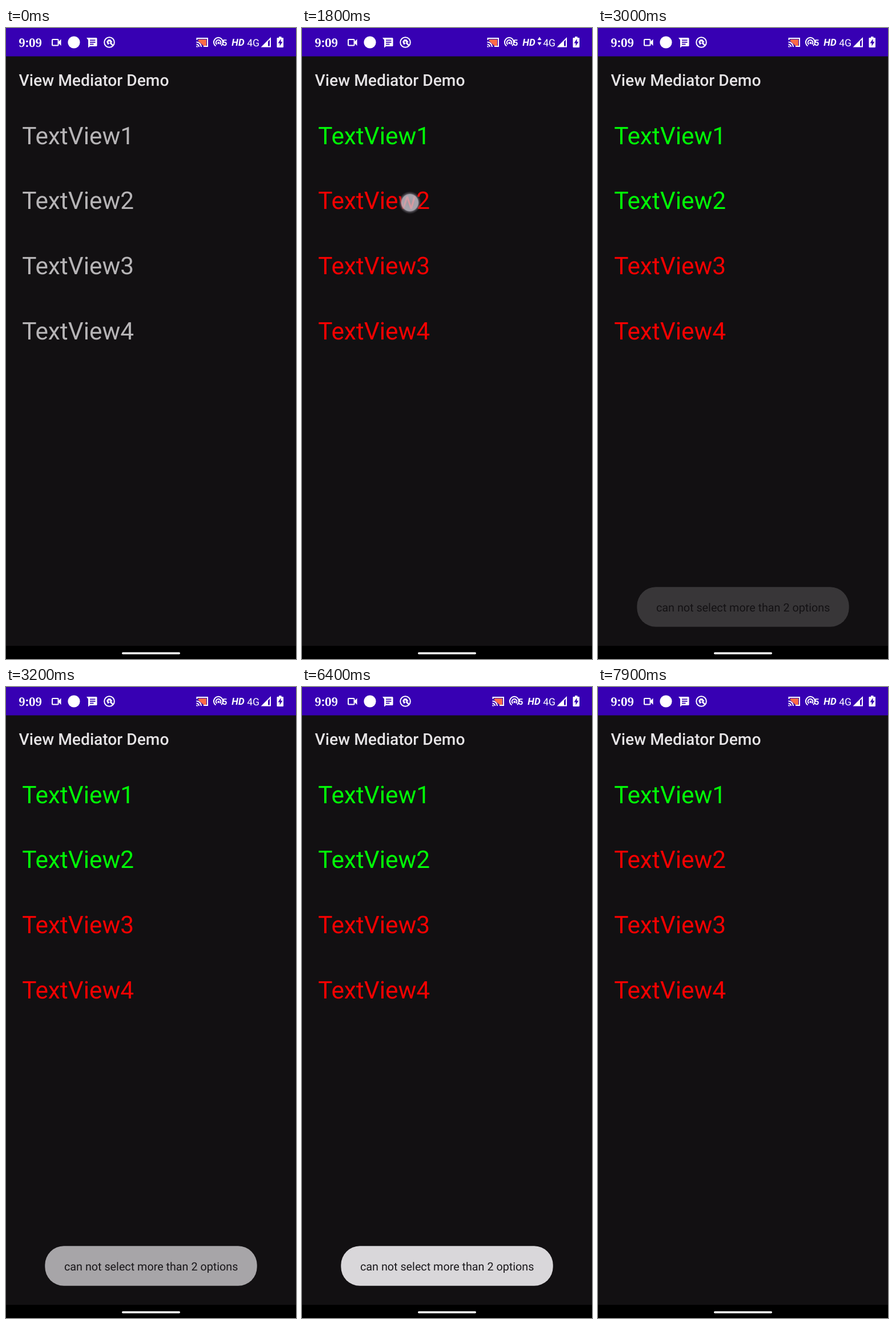
Recreate the animation shown at these times as an HTML page. Size 508 px wide and 1102 px high, loop 8000 ms.

```html
<!DOCTYPE html>
<html lang="en">
<head>
<meta charset="utf-8">
<title>View Mediator Demo</title>
<style>
  html, body { margin: 0; width: 100%; height: 100%; overflow: hidden; background: #121012; }
  svg { display: block; width: 508px; height: 1102px; }
  text { font-family: Roboto, sans-serif; text-rendering: geometricPrecision; }

  .row, .tap, .toast, .arrows, .shift { animation: 8s step-end -16ms infinite; }

  .clock { font: 700 20.5px "Noto Serif", serif; }
  .title { font-size: 28.2px; font-weight: 500; fill: #e5e3e5; }
  .hd { font-size: 17px; font-weight: 700; font-style: italic; font-stretch: 75%; text-anchor: middle; }
  .net { font-size: 17.5px; font-stretch: 75%; text-anchor: end; }
  .five { font-size: 15px; font-weight: 700; }
  .line { fill: none; stroke: #fff; stroke-width: 2; }
  .bar { fill: #3700b3; }

  .row { font-size: 42.33px; fill: #b6b4b6; animation-name: other; }
  .row.first { animation-name: first; }
  .row.second { animation-name: second; }
  @keyframes first { 0% { fill: #b6b4b6 } 8.75%, 100% { fill: #00fc06 } }
  @keyframes second {
    0% { fill: #b6b4b6 }
    8.75% { fill: #f60000 }
    23.75% { fill: #00fc06 }
    97.5%, 100% { fill: #f60000 }
  }
  @keyframes other { 0% { fill: #b6b4b6 } 8.75%, 100% { fill: #f60000 } }

  .tap { opacity: 0; animation-name: tap; }
  @keyframes tap {
    0% { opacity: 0; transform: translate(189px, 191px) }
    7.5% { opacity: 1; transform: translate(189px, 191px) }
    8.75% { opacity: 0; transform: translate(189px, 305px) }
    22.5% { opacity: 1; transform: translate(189px, 305px) }
    23.75% { opacity: 0; transform: translate(191px, 418px) }
    35% { opacity: 1; transform: translate(191px, 418px) }
    36.25% { opacity: 0; transform: translate(189px, 305px) }
    96.25% { opacity: 1; transform: translate(189px, 305px) }
    97.5%, 100% { opacity: 0; transform: translate(189px, 305px) }
  }

  /* Half a second each way: decelerating in, accelerating out. */
  .toast { opacity: 0; animation-name: toast; }
  .toast text { font-size: 19.75px; fill: #1b191c; }
  @keyframes toast {
    0% { opacity: 0 }
    37.5% { opacity: .19 }
    38.75% { opacity: .51 }
    40% { opacity: .75 }
    41.25% { opacity: .91 }
    42.5% { opacity: .99 }
    43.75% { opacity: 1 }
    81.25% { opacity: .98 }
    82.5% { opacity: .88 }
    83.75% { opacity: .71 }
    85% { opacity: .45 }
    86.25% { opacity: .12 }
    87.5%, 100% { opacity: 0 }
  }

  .arrows { opacity: 0; animation-name: arrows; }
  .shift { animation-name: shift; }
  @keyframes arrows { 0% { opacity: 0 } 15% { opacity: 1 } 27.5%, 100% { opacity: 0 } }
  @keyframes shift {
    0% { transform: none }
    15% { transform: translateX(-9px) }
    27.5%, 100% { transform: none }
  }
</style>
</head>
<body>
<svg viewBox="0 0 508 1102">
  <defs>
    <radialGradient id="touch">
      <stop offset="0" stop-color="#d3ccd6" stop-opacity=".72"/>
      <stop offset=".55" stop-color="#c5c0ca" stop-opacity=".84"/>
      <stop offset=".72" stop-color="#b5b1ba" stop-opacity=".9"/>
      <stop offset=".8" stop-color="#77737c" stop-opacity=".6"/>
      <stop offset="1" stop-color="#55515a" stop-opacity="0"/>
    </radialGradient>
  </defs>

  <rect width="508" height="1102" fill="#121012"/>
  <rect class="bar" width="508" height="49.5"/>
  <rect y="1079" width="508" height="23"/>
  <rect x="203" y="1090.3" width="102" height="3.4" rx="1.7" fill="#fff"/>

  <g fill="#fff">
    <text class="clock" x="22.3" y="32.5">9:09</text>
    <rect class="line" x="81" y="20" width="10.5" height="10.5" rx="1"/>
    <path d="M92 24l4.500-4.500v11.500l-4.500-4.500z"/>
    <circle cx="119" cy="25" r="10.600"/>
    <path d="M141 17h17a1.500 1.500 0 0 1 1.500 1.500v12a1.500 1.500 0 0 1-1.500 1.500h-11l-3 2.500v-13.500z"/>
    <path class="bar" d="M147 20.500h9.500v1.700h-9.500zM147 24h9.500v1.700h-9.500zM147 27.500h6.500v1.700h-6.500z"/>
    <circle class="line" cx="181" cy="25" r="8.800"/>
    <path d="M176 24l3-4h4l3.500 4.500-2 1 4 4.500-2 1.500-5-5-3 3z"/>
    <path class="bar" d="M179 24.500l2-1.500 2 2-2 1.500z"/>

    <g class="shift">
      <path d="M337 20h14v11h-5l-9-8z" fill="#ff6a48"/>
      <path class="line" d="M334.500 21v-3h18.500v14h-7M333.500 24.500a8.500 8.500 0 0 1 8.500 8.500M333.500 28.500a4.500 4.500 0 0 1 4.500 4.500"/>
      <path d="M333.500 31v2.500h2.500a2.500 2.500 0 0 0-2.500-2.500z"/>
      <path class="line" d="M367.500 31.500a8 8 0 1 1 9.500-.5M369.500 28.800a4.300 4.300 0 1 1 5.400-.3"/>
      <circle cx="372.300" cy="26" r="2"/>
      <text class="five" x="378.700" y="31">5</text>
      <text class="hd" x="406.500" y="31">HD</text>
    </g>
    <path class="arrows" d="M412.500 21l3.500-5.500 3.500 5.500zM412.500 25h7l-3.500 5.500z"/>
    <text class="net" x="444" y="31.500">4G</text>
    <path d="M446.500 33.500l17.500-17.500v17.500z"/>
    <path class="bar" d="M459 23.500l3-3v11h-3z"/>
    <path d="M478 15h4.500v2h2.500a1 1 0 0 1 1 1v15a1 1 0 0 1-1 1h-9.500a1 1 0 0 1-1-1v-15a1 1 0 0 1 1-1h2.500z"/>
    <path class="bar" d="M481.500 19l-5 7.500h3v5l5-7.500h-3z"/>
  </g>

  <text class="title" x="22.600" y="100.500">View Mediator Demo</text>

  <text class="row first" x="28.200" y="202.700">TextView1</text>
  <text class="row second" x="28.200" y="316.400">TextView2</text>
  <text class="row" x="28.200" y="430.100">TextView3</text>
  <text class="row" x="28.200" y="543.800">TextView4</text>

  <g class="toast">
    <rect x="68.300" y="976.300" width="371.400" height="69.500" rx="33" fill="#d9d7da"/>
    <text x="102" y="1018.700">can not select more than 2 options</text>
  </g>

  <circle class="tap" r="20" fill="url(#touch)"/>
</svg>
</body>
</html>
```
